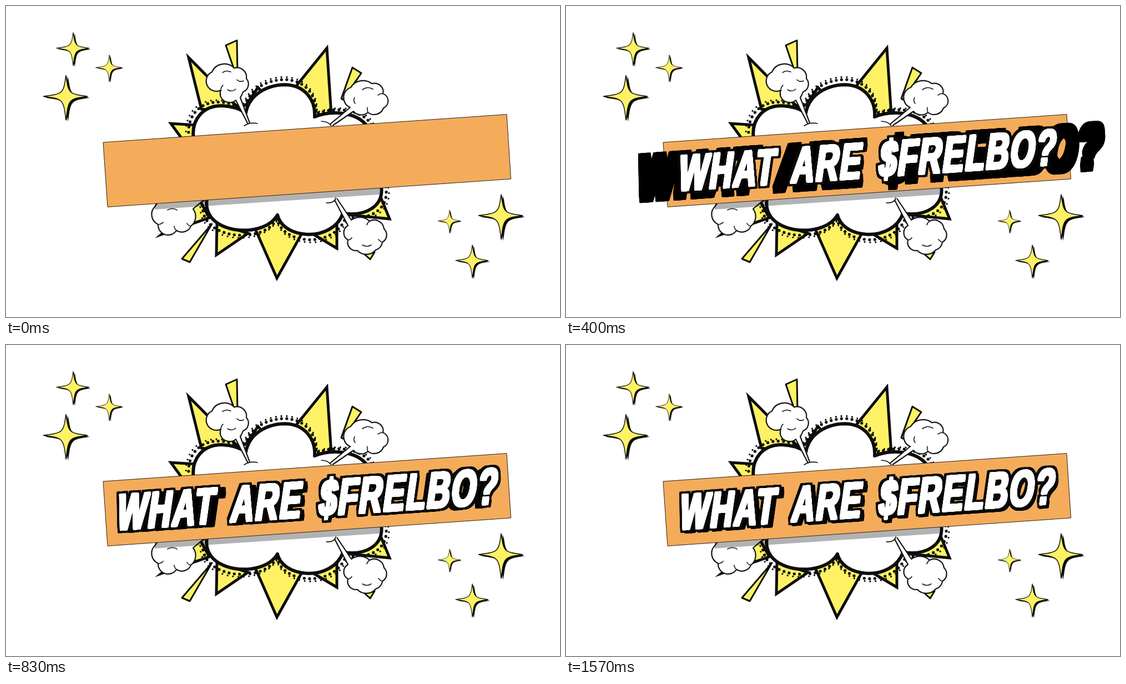
Recreate the animation shown at these times as an HTML page. Size 998 by 561 pixels, loop 5.01 s.

```html
<!DOCTYPE html>
<html lang="en">
<head>
<meta charset="utf-8">
<title>Comic banner</title>
<style>
  html, body { margin: 0; width: 100%; height: 100%; overflow: hidden; background: #fff; }
  svg { display: block; width: 100vw; height: 100vh; }
  text { font: 700 90px "Liberation Sans", Arial, sans-serif; letter-spacing: .05em; word-spacing: .2em; text-anchor: middle; }
  .spike { fill: #fef264; stroke: #0d0d0d; stroke-width: 5; stroke-miterlimit: 8; }
  .chip { fill: #fef264; stroke: #0d0d0d; stroke-width: 3; stroke-linejoin: round; }
  .dots { fill: none; stroke: #0d0d0d; stroke-linecap: round; }
  .cloud { fill: #fff; stroke: #0d0d0d; stroke-width: 6; stroke-linejoin: round; }
  .puff { fill: #fff; stroke: #161616; stroke-width: 2.2; stroke-linejoin: round; }
  .curl { fill: none; stroke: #161616; stroke-width: 1.6; stroke-linecap: round; }
</style>
</head>
<body>
<svg viewBox="0 0 998 561" preserveAspectRatio="none">
  <defs>
    <path id="star" d="M0-.93C.11-.12 .12-.11 .95 0C.12 .11 .11 .12 0 1.05C-.11 .12-.12 .11-1 0C-.12-.11-.11-.12 0-.93Z"/>
    <g id="sparkle">
      <use href="#star" x=".1" y=".07" fill="#0d0d0d"/>
      <use href="#star" x=".05" y=".035" fill="#0d0d0d"/>
      <use href="#star" fill="#fef264" stroke="#0d0d0d" stroke-width=".035"/>
    </g>
    <path id="cloud" d="M338 240C333 205 355 179 390 180Q415 181 432 193C438 160 470 142 503 142
      C537 143 558 168 556 200C585 188 630 190 650 216L676 325C681 360 650 380 607 374
      C598 400 570 413 543 412C510 410 493 394 489 377C475 401 440 408 410 403C372 395 354 372 364 338Z"/>
    <text id="words" y="31" transform="skewX(-12) scale(.625 1)">WHAT ARE $FRELBO?</text>
  </defs>

  <use href="#sparkle" transform="translate(121 76) scale(30.5)"/>
  <use href="#sparkle" transform="translate(186 111) scale(24.5)"/>
  <use href="#sparkle" transform="translate(108 163) scale(41)"/>
  <use href="#sparkle" transform="translate(799 387.5) scale(21)"/>
  <use href="#sparkle" transform="translate(892 378) scale(41)"/>
  <use href="#sparkle" transform="translate(840 459) scale(30.5)"/>

  <g class="spike">
    <path d="M329 93L352 186L430 195Z"/>
    <path d="M454 147L434 176L466 160Z"/>
    <path d="M578 76L586 196L556 205L523 144Z"/>
    <path d="M297 212L345 215L332 260Z"/>
    <path d="M280 412L350 352L366 382Z"/>
    <path d="M380 392L379 449L436 410Z"/>
    <path d="M489 372L448 400L488 491L532 412Z"/>
    <path d="M554 412L596 437L596 392Z"/>
    <path d="M610 376L691 384L675 345Z"/>
  </g>
  <g class="chip">
    <path d="M396 71L416 62L417 120L410 112Z"/>
    <path d="M624 111L640 121L607 169L604 167Z"/>
    <path d="M317 456L331 462L371 393Z"/>
    <path d="M646 448L656 457L664 444Z"/>
  </g>
  <g class="dots">
    <use href="#cloud" transform="translate(505 275) scale(1.05 1.07) translate(-505 -275)" stroke-width="5" stroke-dasharray="0 9"/>
    <use href="#cloud" transform="translate(505 275) scale(1.078 1.105) translate(-505 -275)" stroke-width="3" stroke-dasharray="0 9"/>
  </g>
  <use href="#cloud" class="cloud"/>

  <g class="puff">
    <path d="M436 213L414 170A17 16 0 0 1 387 152A17 17 0 0 1 371 119A24 23 0 0 1 411 112A17 17 0 0 1 433 131A15 15 0 0 1 427 155Q425 161 422 165L439 211"/>
    <path d="M583 214L620 183A18 19 0 0 1 621 147A25 23 0 0 1 659 140A16 15 0 0 1 679 158A14 14 0 0 1 680 184A18 18 0 0 1 652 192A17 15 0 0 1 626 190L588 216"/>
    <path d="M356 350L337 366A22 22 0 0 1 333 397A17 15 0 0 1 307 405A18 18 0 0 1 274 394A20 20 0 0 1 268 362L280 345Z"/>
    <path d="M596 347L622 386A26 26 0 0 1 655 388A18 18 0 0 1 681 402A15 15 0 0 1 678 426A16 16 0 0 1 666 440A20 17 0 0 1 633 441A15 15 0 0 1 616 422A15 15 0 0 1 616 396L592 350"/>
  </g>
  <g class="curl">
    <path d="M429 216Q440 209 453 212M568 208Q580 208 586 216M577 355Q592 356 594 346"/>
    <path d="M390 120Q397 115 405 119M387 152Q387 146 391 143M399 151Q407 156 414 150M416 133Q421 138 428 135"/>
    <path d="M642 151Q651 144 661 150M679 158Q673 158 670 161M652 192Q650 187 651 183M628 165Q625 171 629 176"/>
    <path d="M274 394Q280 394 283 390M307 405Q303 401 303 397M333 397Q328 396 326 392M291 368Q300 363 308 368"/>
    <path d="M655 388Q651 391 650 395M678 426Q674 425 671 421M616 422Q620 422 623 418M642 431Q650 436 658 431"/>
  </g>

  <path d="M268 357L673 328V340L268 367Z" fill="#000" fill-opacity=".3"/>
  <path d="M175 246L902 195.500L909.500 312L183 362.500Z" fill="#f4ac5b" stroke="#2b2118"/>

  <g transform="translate(545 278) rotate(-4)">
    <g id="shade"></g>
    <g id="face"></g>
  </g>
</svg>
<script>
  const LOOP = 5010, START = 30, SETTLED = 1570, LAG = 202;
  const shade = document.getElementById('shade');
  const face = document.getElementById('face');

  // Thickens the lettering by stamping it around a square, which keeps its corners sharp.
  function stamp(group, radius, color) {
    const count = 24;
    const clamp = v => Math.max(-1, Math.min(1, v * Math.SQRT2)) * radius;
    for (let i = 0; i < count; i++) {
      const a = i / count * 2 * Math.PI;
      const use = document.createElementNS('http://www.w3.org/2000/svg', 'use');
      use.setAttribute('href', '#words');
      use.setAttribute('x', clamp(Math.cos(a)).toFixed(2));
      use.setAttribute('y', clamp(Math.sin(a)).toFixed(2));
      use.setAttribute('fill', color);
      group.append(use);
    }
  }

  stamp(shade, 5.2, '#000');
  stamp(face, 6, '#0a0a0a');
  stamp(face, 1.9, '#fff');

  // Damped spring from 0 to 1.
  const spring = t => t <= 0 ? 0 : 1 - Math.exp(-0.0051 * t) * Math.cos(2 * Math.PI * t / 540);

  function pose(t) {
    if (t < START) return [0, 0];
    return t < SETTLED ? [spring(t), spring(t - LAG)] : [1, 1];
  }

  function draw() {
    const [near, far] = pose(performance.now() % LOOP);
    face.setAttribute('transform', `scale(${near})`);
    shade.setAttribute('transform', `scale(${far * 0.992}) translate(4 3)`);
    requestAnimationFrame(draw);
  }
  draw();
</script>
</body>
</html>
```
